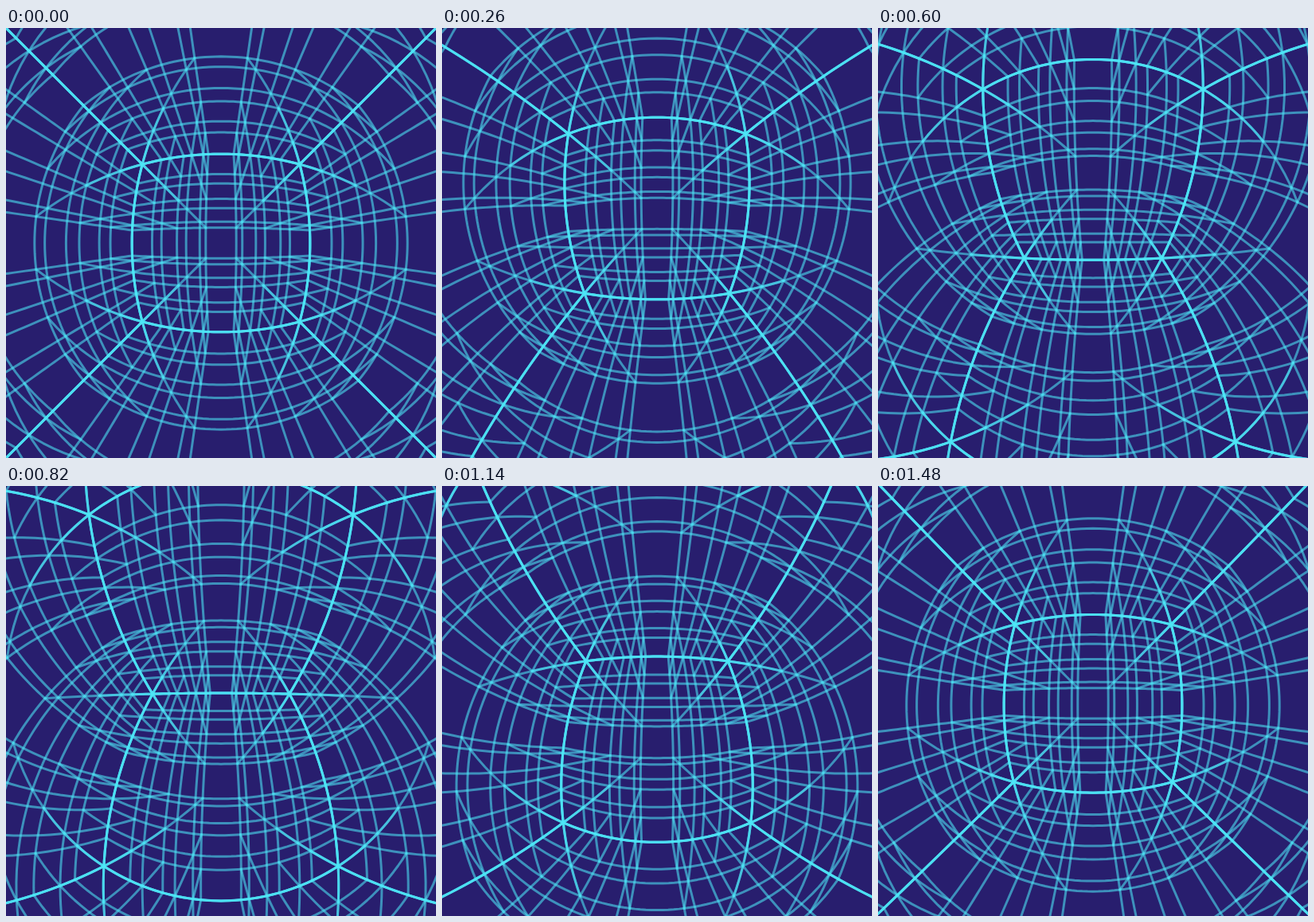
Animation of 540x540 px, one loop 1.5 s. Source, as an HTML page with a canvas:

```html
<!DOCTYPE html>
<html lang="en">
<head>
<meta charset="utf-8">
<title>Lattice from within</title>
<style>
  html, body { margin: 0; height: 100%; overflow: hidden; background: #281e6e; }
  canvas { display: block; }
</style>
</head>
<body>
<canvas id="stage" width="540" height="540"></canvas>
<script>
const ctx = document.getElementById('stage').getContext('2d');
const SIZE = 540, HALF = SIZE / 2;
const LOOP = 1500, STEP = 20;
const EDGE = 7, SEGMENTS = 56;
const COORDS = [-7, -5, -3, -1, 1, 3, 5, 7];

// Every line of an 8 x 8 x 8 lattice, sampled at even angles as seen from its centre.
const lines = [];
for (let axis = 0; axis < 3; axis++) {
  for (const u of COORDS) for (const v of COORDS) {
    const distance = Math.hypot(u, v);
    const reach = Math.atan(EDGE / distance);
    const points = [];
    for (let i = 0; i <= SEGMENTS; i++) {
      const along = distance * Math.tan(reach * (2 * i / SEGMENTS - 1));
      const point = [];
      point[axis] = along;
      point[(axis + 1) % 3] = u;
      point[(axis + 2) % 3] = v;
      points.push(point);
    }
    lines.push(points);
  }
}

// Stereographic view after a turn about the x axis.
function strokeLine(points, cos, sin) {
  let drawing = false;
  ctx.beginPath();
  for (const [x, y, z] of points) {
    const ry = y * cos - z * sin;
    const rz = y * sin + z * cos;
    const length = Math.hypot(x, y, z);
    const depth = length + rz;
    if (depth < 0.1 * length) {
      drawing = false;
      continue;
    }
    const px = HALF + HALF * x / depth;
    const py = HALF + HALF * ry / depth;
    if (drawing) ctx.lineTo(px, py);
    else ctx.moveTo(px, py);
    drawing = true;
  }
  ctx.stroke();
}

function draw(ms) {
  const time = Math.floor((ms % LOOP) / STEP) * STEP;
  const angle = Math.PI / 2 * time / LOOP;
  const cos = Math.cos(angle), sin = Math.sin(angle);
  ctx.fillStyle = '#281e6e';
  ctx.fillRect(0, 0, SIZE, SIZE);
  ctx.strokeStyle = 'rgba(78, 232, 248, 0.57)';
  ctx.lineWidth = 3;
  ctx.lineCap = ctx.lineJoin = 'round';
  for (const points of lines) strokeLine(points, cos, sin);
}

const start = performance.now();
function tick() {
  draw(performance.now() - start);
  requestAnimationFrame(tick);
}
tick();
</script>
</body>
</html>
```
